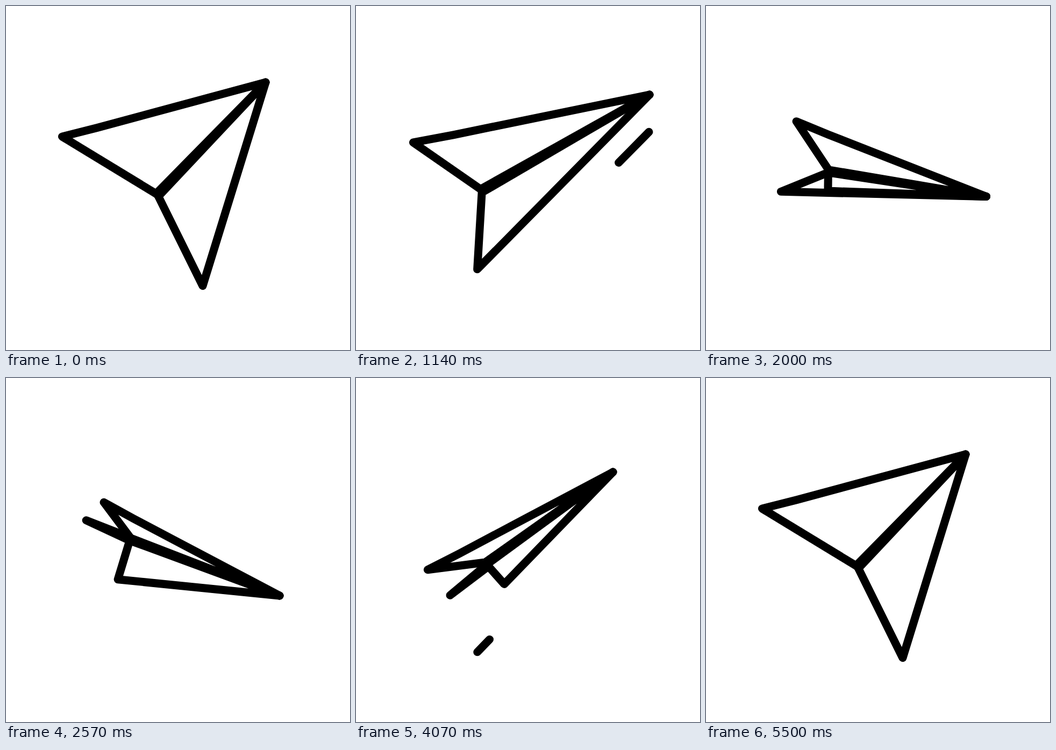
An HTML page for the animation above (5.57 s loop, 640 px wide and 640 px high).

```html
<!DOCTYPE html>
<html lang="en">
<head>
<meta charset="utf-8">
<title>Paper plane</title>
<style>
  html, body { margin: 0; width: 100%; height: 100%; overflow: hidden; background: #fff; }
  svg { display: block; width: 100vw; height: 100vh; }
  path { fill: #fff; stroke: #000; stroke-width: 15px; stroke-linecap: round; stroke-linejoin: round; }
</style>
</head>
<body>
<svg viewBox="0 0 640 640">
  <g id="art">
    <path id="right"/><path id="left"/><path id="keel"/>
  </g>
</svg>
<script>
const LOOP = 5570, STEPS = 78, PERIOD = 77;

// A few attitudes of the plane. Wings are [sweep behind the notch, spread from the axis].
const ATTITUDES = [
  { tick: 0,  tip: [483, 142], notch: [281, 351], left: [45, 202], right: [63, 179], depth: 4 },
  { tick: 8,  tip: [521, 138], notch: [253, 357], left: [77, 168], right: [83, 155], depth: 0 },
  { tick: 16, tip: [546, 165], notch: [233, 343], left: [66, 140], right: [79, 124], depth: 4 },
  { tick: 22, tip: [534, 286], notch: [226, 321], left: [77, 113], right: [76, 100], depth: 4 },
  { tick: 36, tip: [509, 405], notch: [231, 300], left: [70, 47],  right: [89, -4],  depth: 78 },
  { tick: 45, tip: [519, 315], notch: [226, 340], left: [93, 49],  right: [90, 21],  depth: 65 },
  { tick: 57, tip: [478, 175], notch: [242, 345], left: [95, 54],  right: [89, 9],   depth: 51 }
];

// Wind streaks run backwards from the tip, parallel to one edge
const STREAKS = [
  { edge: 'left',  start: 3.1,   span: 7.84,  from: 4,  to: 390, gap: -58 },
  { edge: 'right', start: 14.5,  span: 7.84,  from: 50, to: 365, gap: 48 },
  { edge: 'left',  start: 44.25, span: 7.84,  from: 4,  to: 430, gap: -55 },
  { edge: 'keel',  start: 47.25, span: 10.36, from: 0,  to: 416, gap: 52 }
];

const art = document.getElementById('art');
const parts = Object.fromEntries([...art.children].map(el => [el.id, el]));
for (const s of STREAKS) {
  s.el = document.createElementNS('http://www.w3.org/2000/svg', 'path');
  art.append(s.el);
}

const clamp = v => Math.min(1, Math.max(0, v));
const line = (...pts) => 'M' + pts.map(p => p.map(v => v.toFixed(2)).join()).join('L');

// Local frame of the line from one point to another: move along it and across it
function frame(from, to) {
  const dx = to[0] - from[0], dy = to[1] - from[1], len = Math.hypot(dx, dy);
  const ux = dx / len, uy = dy / len;
  return (origin, along, across) =>
    [origin[0] + ux * along - uy * across, origin[1] + uy * along + ux * across];
}

function attitude(i) {
  const n = ATTITUDES.length, turn = Math.floor(i / n), a = ATTITUDES[i - turn * n];
  return { tick: a.tick + turn * PERIOD, vals: [a.tip, a.notch, a.left, a.right, a.depth].flat() };
}

// Cubic Hermite through the looping attitudes
function blend(tick) {
  const i = ATTITUDES.findLastIndex(a => a.tick <= tick);
  const [a, b, c, d] = [-1, 0, 1, 2].map(o => attitude(i + o));
  const h = c.tick - b.tick, u = (tick - b.tick) / h;
  return b.vals.map((p, j) => {
    const q = c.vals[j];
    const m = (q - a.vals[j]) / (c.tick - a.tick) * h;
    const n = (d.vals[j] - p) / (d.tick - b.tick) * h;
    return p + u * (m + u * (3 * (q - p) - 2 * m - n + u * (2 * (p - q) + m + n)));
  });
}

function pose(tick) {
  const [tx, ty, nx, ny, lSweep, lSpread, rSweep, rSpread, depth] = blend(tick);
  const tip = [tx, ty], notch = [nx, ny], at = frame(notch, tip);
  const fold = Math.min(2.5, Math.max(0, depth));
  return {
    tip,
    left: at(notch, -lSweep, -lSpread),
    right: at(notch, -rSweep, rSpread),
    keel: at(notch, 5, depth),
    upper: at(notch, 0, -fold),
    lower: at(notch, 0, fold)
  };
}

function streakPath(s, tick, p) {
  const t = (tick - s.start) / s.span;
  if (t <= 0 || t >= 1) return '';
  const at = frame(p[s.edge], p.tip);
  const point = f => at(p.tip, -s.from - (s.to - s.from) * clamp(f), s.gap);
  return line(point(t / 0.75), point((t - 0.25) / 0.75));
}

function draw(tick) {
  const p = pose(tick);
  const bend = p.left.map((v, i) => v + 0.17 * (p.tip[i] - v) + i);
  parts.right.setAttribute('d', line(p.tip, p.right, p.lower) + 'Z');
  parts.left.setAttribute('d', line(p.tip, bend, p.left, p.upper) + 'Z');
  parts.keel.setAttribute('d', line(p.tip, p.keel, p.lower) + 'Z');
  for (const s of STREAKS) s.el.setAttribute('d', streakPath(s, tick, p));
}

const began = performance.now();
function loop() {
  const t = (performance.now() - began) % LOOP;
  const step = Math.floor((t + 5) / LOOP * STEPS) % STEPS;
  draw(step % PERIOD);
  requestAnimationFrame(loop);
}
loop();
</script>
</body>
</html>
```
